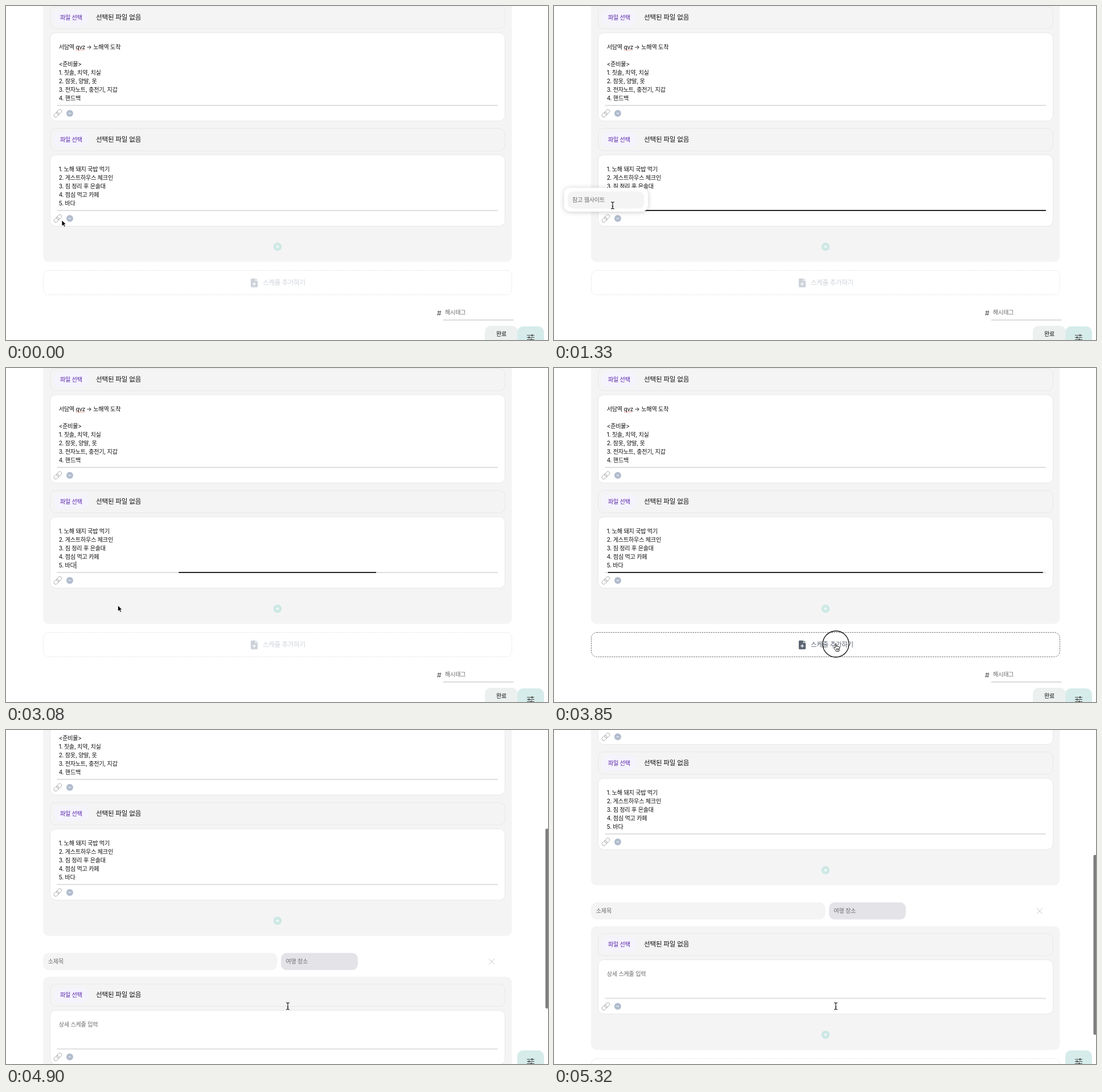
These frames come from a looping animation (952 by 588 pixels, 5390 ms). An HTML page:

```html
<!DOCTYPE html>
<html lang="ko">
<head>
<meta charset="utf-8">
<title>여행 스케줄</title>
<style>
html, body { margin: 0; width: 100%; height: 100%; overflow: hidden; background: #fff; }
svg { display: block; width: 952px; height: 588px; }
text { font-family: Inter, "Noto Sans CJK KR", "Noto Sans CJK", sans-serif; font-size: 10.2px; letter-spacing: -.3px; fill: #111; white-space: pre; }
text.big { font-size: 11.7px; }
text.add { font-size: 11.5px; fill: currentColor; }
text.pick { font-weight: 500; fill: #5420a8; }
text.done { font-weight: 500; }
text.hint { fill: #6c6c70; }
text.hash { font-size: 12px; fill: #444; }
#popup { filter: drop-shadow(0 1px 4px rgba(0,0,0,.2)); }
</style>
</head>
<body>
<svg id="stage" viewBox="0 0 952 588" xmlns="http://www.w3.org/2000/svg"></svg>
<script>
const LOOP = 5390, STEP = 70;

// Markup helpers
const rect = (x, y, w, h, r, fill, extra = '') =>
  `<rect x="${x}" y="${y}" width="${w}" height="${h}" rx="${r}" fill="${fill}" ${extra}/>`;
const path = (d, stroke, width = 1, extra = '') =>
  `<path d="${d}" fill="none" stroke="${stroke}" stroke-width="${width}" ${extra}/>`;
// y is the middle of the line
const text = (x, y, str, cls = '') =>
  `<text x="${x}" y="${y + 3.8}" class="${cls}">${str.replace(/</g, '&lt;')}</text>`;

const panel = (y, h) => rect(65, y, 823.5, h, 10, '#f4f4f4');

const filePicker = y =>
  rect(77.5, y + .5, 799, 39.5, 10, '#f4f4f4', 'stroke="#e6e8ec"') +
  rect(83, y + 6.5, 63, 27, 13.5, '#f5f3fc') +
  text(95, y + 20, '파일 선택', 'pick') +
  text(158, y + 19.7, '선택된 파일 없음', 'big');

const link = y =>
  `<g transform="translate(91 ${y}) rotate(-45)" fill="none" stroke="#a4a4a4" stroke-width=".9">
    <rect x="-8.3" y="-3.1" width="10" height="6.2" rx="3.1"/>
    <rect x="-1.7" y="-3.1" width="10" height="6.2" rx="3.1"/></g>`;

const minus = y =>
  `<circle cx="112" cy="${y}" r="6" fill="#b1bccd"/>` + path(`M109.8 ${y}h4.4`, '#fff', 1.1);

const plus = y =>
  `<circle cx="477" cy="${y}" r="7.3" fill="#cde8e4"/>` +
  path(`M474.3 ${y}h5.4M477 ${y - 2.7}v5.4`, '#fff', 1.2);

const card = (y, h, lines, cls) =>
  rect(77.5, y + .5, 799, h - 1, 10, '#fff', 'stroke="#e5e7eb"') +
  lines.map((s, i) => text(92.7, y + 25.5 + i * 14.95, s, cls)).join('') +
  rect(89.5, y + h - 29, 774.5, 2, 0, '#dfdfe2') +
  link(y + h - 14) + minus(y + h - 14);

const schedule = () =>
  panel(-20, 470.5) +
  filePicker(0) +
  card(46.5, 156.5, ['', '', '<준비물>', '1. 칫솔, 치약, 치실', '2. 잠옷, 양말, 옷',
    '3. 전자노트, 충전기, 지갑', '4. 핸드백']) +
  text(92.7, 72, '서담역') + text(122.5, 72, 'qvz') +
  text(141, 72, '→') + text(153.3, 72, '노해역 도착') +
  path('M123 77.5h15', '#e0483e', 1, 'stroke-dasharray="1.3 1.3"') +
  filePicker(215) +
  card(261.5, 126.5, ['1. 노해 돼지 국밥 먹기', '2. 게스트하우스 체크인',
    '3. 짐 정리 후 은솔대', '4. 점심 먹고 카페', '5. 바다']) +
  '<rect id="focus" y="359" height="1.8" fill="#111"/>' +
  rect(122.2, 340.5, 1, 13, 0, '#111', 'id="caret"') +
  plus(423.8);

const addBox = `<g id="addBox">
  <rect id="dash" x="65.5" y="465.5" width="823" height="43" rx="10" fill="#fff" stroke-dasharray="2.5 1.5"/>
  <path d="M431.5 479.7h6.3v4.3h4.3v9.6a1.6 1.6 0 0 1-1.6 1.6h-9a1.6 1.6 0 0 1-1.6-1.6v-12.3a1.6 1.6 0 0 1 1.6-1.6zM438.8 479.7l3.3 3.4h-3.3z" fill="currentColor"/>
  ${path('M433 489.3h6M436 486.3v6', '#fff', 1.3)}
  ${text(451, 486.8, '스케줄 추가하기', 'add')}</g>`;

const footer = '<g id="footer">' +
  text(757, 541.5, '#', 'hash') + text(771, 539.5, '해시태그', 'hint') +
  rect(768, 552, 123.5, 1.5, 0, '#cfcfd2') +
  rect(841, 563, 58, 40, 10, '#ecf1f0') +
  text(861, 577, '완료', 'done') + '</g>';

const newSchedule = '<g id="added">' +
  rect(65, 480.6, 411.5, 30, 10, '#f4f4f4') + text(73.8, 495.2, '소제목', 'hint') +
  rect(483, 480.6, 135, 30, 10, '#e3e3e8') + text(491.3, 495.2, '여행 장소', 'hint') +
  path('M848 490.7l10 10m0-10l-10 10', '#c6c6c9') +
  panel(522.6, 217.7) + filePicker(534.5) +
  card(581, 96.5, ['상세 스케줄 입력'], 'hint') + plus(713.5) + '</g>';

const popup = `<g id="popup">${rect(17.5, 320, 147.5, 42, 10, '#fff')}
  ${rect(24, 326.3, 134.5, 30.5, 10, '#f4f4f4')}
  <g id="hint">${text(32, 341, '참고 웹사이트', 'hint')}</g>
  <g id="url" clip-path="url(#field)">${text(32, 341, 'https://narumel.example/guide')}</g>
  ${rect(32, 334.5, 1, 13, 0, '#111', 'id="popCaret"')}</g>`;

const tools = rect(898, 564, 47, 40, 10, '#d6ecea') +
  path('M915 579.7h13M915 583.5h13M915 587.3h13', '#444', 1.1) +
  path('M924 577.9v3.6M918.7 581.7v3.6M922.6 585.5v3.6', '#444', 1.8);

const cursors = `<g id="cursor">
  <path id="arrow" d="M0 0V10.6L2.5 8.3L4.2 12.1L6.1 11.3L4.4 7.6H7.6Z" fill="#000" stroke="#fff" stroke-width=".8"/>
  <path id="hand" d="M-1.1 .2a1 1 0 0 1 2 0V4.4a1 1 0 0 1 1.9 .1a1 1 0 0 1 1.9 .4a1 1 0 0 1 1.8 .7V8.4C6.5 10 5.7 10.8 5.5 12.8H.3C-.2 10.7-2.2 9-3.4 7.2C-4 6.1-2.8 5.2-1.9 6.1L-1.1 6.9ZM1.5 7.6v3M3.1 7.6v3M4.7 7.6v3" fill="#fff" stroke="#000" stroke-width=".9"/>
  <path id="beam" d="M-3-6Q0-6 0-4.2Q0-6 3-6M0-4.4V4.4M-3 6Q0 6 0 4.2Q0 6 3 6M-1.4 1.8H1.4" fill="none" stroke="#111" stroke-width="1.1"/></g>`;

document.getElementById('stage').innerHTML =
  `<clipPath id="field"><rect x="32" y="330" width="118" height="24"/></clipPath>
  <rect width="952" height="588" fill="#fff"/>
  <g id="page">${schedule()}${newSchedule}${addBox}${footer}</g>
  ${tools}${popup}
  <rect id="bar" x="947.5" width="6" height="316.5" rx="2" fill="#7c7c7c"/>
  <circle id="ring" r="23" fill="none" stroke="#111" stroke-width="1.3"/>${cursors}`;

const ui = {};
document.querySelectorAll('[id]').forEach(el => ui[el.id] = el);

// Timing helpers
const clamp = v => Math.max(0, Math.min(1, v));
const between = (t, a, b) => t >= a && t < b;
const show = (el, on) => el.setAttribute('display', on ? 'inline' : 'none');
const set = (el, attrs) => { for (const k in attrs) el.setAttribute(k, attrs[k]); };

// cubic-bezier(0, 0, .2, 1)
function easeOut(x) {
  x = clamp(x);
  let lo = 0, hi = 1;
  for (let i = 0; i < 24; i++) {
    const u = (lo + hi) / 2;
    if (.6 * (1 - u) * u * u + u ** 3 < x) lo = u; else hi = u;
  }
  return 3 * (1 - lo) * lo * lo + lo ** 3;
}

function track(keys, t) {
  let i = 0;
  while (i < keys.length - 2 && keys[i + 1][0] <= t) i++;
  const a = keys[i], b = keys[i + 1], k = clamp((t - a[0]) / (b[0] - a[0]));
  return a.slice(1).map((v, j) => v + (b[j + 1] - v) * k);
}

const mouse = [[0, 98, 377], [70, 101, 370], [630, 101, 370], [700, 102, 380], [1120, 100, 374],
  [1190, 100, 374], [1260, 102, 360], [1330, 103, 351], [2380, 103, 351], [2450, 135, 378],
  [2520, 181, 411], [2730, 181, 411], [2940, 196.5, 418], [3080, 196.5, 418], [3150, 230, 430],
  [3220, 325, 457], [3290, 430, 478], [3360, 486, 488], [3430, 486, 488], [3570, 495, 486]];
const shapes = [[0, 'arrow'], [70, 'hand'], [1260, 'beam'], [2450, 'arrow'], [3290, 'hand'], [4130, 'beam']];
const scrolls = [[4690, 0], [4760, 15.5], [4830, 50], [4900, 88], [4970, 120], [5040, 144],
  [5110, 158], [5180, 167], [5250, 173], [5320, 177]];
const clicks = [210, 1470, 2520, 3850];
const focuses = [[390, 1607], [3046, 3849.4]];

function render(t) {
  const [scroll] = track(scrolls, t);
  const grown = t >= 4130, hover = between(t, 3290, 4130);

  ui.page.setAttribute('transform', `translate(0 ${-scroll})`);
  show(ui.added, grown);
  for (const g of [ui.addBox, ui.footer]) g.setAttribute('transform', `translate(0 ${grown ? 290 : 0})`);
  ui.addBox.setAttribute('color', hover ? '#5b6472' : '#cdd2d9');
  ui.dash.setAttribute('stroke', hover ? '#707070' : '#e4e4e6');
  show(ui.bar, t >= 4760);
  ui.bar.setAttribute('y', 128 + .52 * scroll);

  let part = 0;
  for (const [on, off] of focuses)
    part += easeOut((t - on) / 200) - easeOut((t - off) / 200);
  const width = 774.5 * clamp(part);
  set(ui.focus, { x: 476.75 - width / 2, width });
  show(ui.caret, between(t, 3010, 3500));

  const open = easeOut((t - 600) / 300) * (1 - easeOut((t - 2700) / 220));
  const scale = .8 + .2 * open;
  show(ui.popup, open > 0);
  set(ui.popup, {
    opacity: open,
    transform: `translate(91 341) scale(${scale}) translate(-91 -341)`
  });
  show(ui.hint, t < 2170);
  show(ui.url, t >= 2170);
  show(ui.popCaret, between(t, 1610, 2170));

  const [x, y] = track(mouse, t);
  const at = `translate(${x} ${y})`;
  const shape = shapes.filter(s => s[0] <= t).pop()[1];
  ui.cursor.setAttribute('transform', at);
  for (const name of ['arrow', 'hand', 'beam']) show(ui[name], name === shape);

  const click = clicks.find(c => between(t, c, c + 280));
  show(ui.ring, click !== undefined);
  set(ui.ring, { transform: at, opacity: t - click < 210 ? 1 : .5 });
}

const start = performance.now();
function tick() {
  const t = (performance.now() - start) % LOOP;
  render(Math.floor(t / STEP) * STEP);
  requestAnimationFrame(tick);
}
tick();
</script>
</body>
</html>
```
